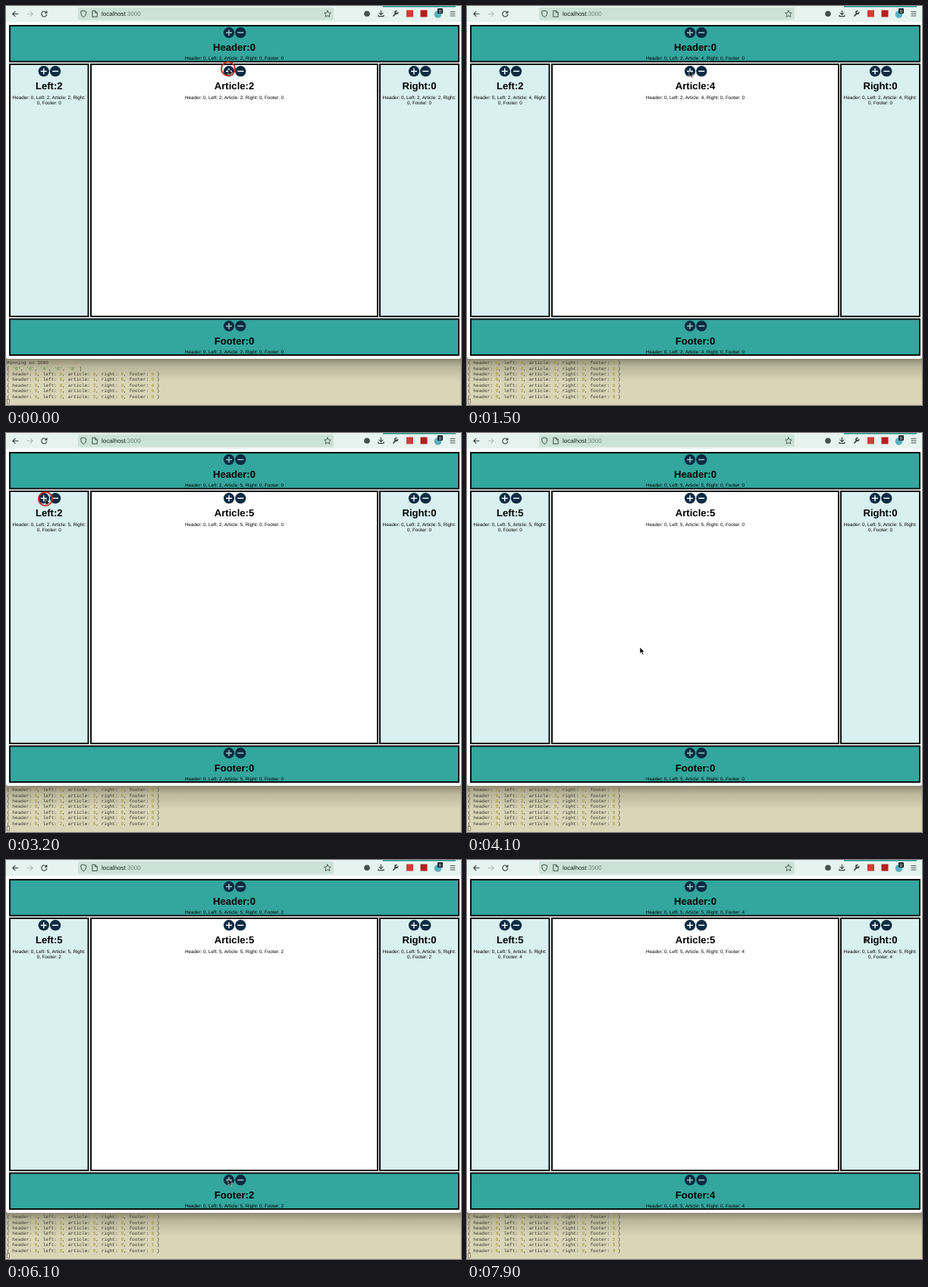
Write an HTML page that moves like this. It is 600x527 px and loops after 8000 ms.

```html
<!DOCTYPE html>
<html lang="en">
<head>
<meta charset="utf-8">
<title>Layout counters</title>
<style>
html, body { margin: 0; height: 100%; overflow: hidden; background: #dbd5b8; }
svg { display: block; width: 600px; height: 527px; text-rendering: geometricPrecision; }
text { font: 6.3px "Liberation Sans", Arial, sans-serif; }
.mid { text-anchor: middle; }
.title { font-size: 13.1px; font-weight: bold; }
.url { font-size: 8px; }
#log text { font: 6.12px "Liberation Mono", Courier, monospace; fill: #3a382e; }
#log .num { fill: #a0941c; }
#log .str { fill: #4b8a2c; }
.icon { fill: none; stroke: #34423d; stroke-width: 1.1; stroke-linecap: round; stroke-linejoin: round; }
</style>
</head>
<body>
<svg viewBox="0 0 600 527">
  <defs>
    <linearGradient id="shade" x2="0" y2="1">
      <stop stop-color="#55523f" stop-opacity=".6"/>
      <stop offset=".35" stop-color="#55523f" stop-opacity=".24"/>
      <stop offset="1" stop-color="#55523f" stop-opacity="0"/>
    </linearGradient>
  </defs>
  <rect width="600" height="527" fill="#dbd5b8"/>
  <rect y="465" width="600" height="32" fill="url(#shade)"/>
  <g id="log"></g>
  <rect x="1.5" y="519.5" width="3" height="6" fill="none" stroke="#77735f" stroke-width=".7"/>

  <path d="M0 0H600V463a3 3 0 0 1-3 3H3a3 3 0 0 1-3-3z" fill="#fff"/>
  <rect width="600" height="21" fill="#e7f3ee"/>
  <rect x="497" width="96" height="1.5" fill="#269187"/>
  <rect x="95" y="2" width="337" height="16.5" rx="2" fill="#cbe2d8"/>
  <g class="icon">
    <path d="M16 10.5H9M12 7.3 8.8 10.5 12 13.7"/>
    <path d="M28 10.5h7M32 7.3l3.2 3.2-3.2 3.2" stroke="#b3c1bb"/>
    <path d="M53.2 8.6a3.5 3.5 0 1 0 .5 2.8M53.9 6.7v2.4h-2.4"/>
    <path d="M102.2 6.2l3.5 1.2c0 4-.9 5.8-3.5 7.3-2.6-1.5-3.5-3.3-3.5-7.3z" stroke-width=".9"/>
    <path d="M114.2 6.3h3.6l2.4 2.4v5.6h-6zM117.6 6.5v2.4h2.4" stroke-width=".9"/>
    <path d="M424 6l1.3 2.8 3 .4-2.2 2.1.6 3-2.7-1.5-2.7 1.5.6-3-2.2-2.1 3-.4z" stroke-width=".8"/>
    <path d="M494.5 6v5.4M492 9.2l2.5 2.4L497 9.2M491 12v1.6h7V12"/>
    <path d="M511 13l3.6-3.8" stroke-width="1.8"/>
    <path d="M516.8 8.5a2 2 0 1 1-1.6-1.9" stroke-width="1.4"/>
    <path d="M586 7.6h6M586 10.3h6M586 13h6" stroke-width=".9"/>
  </g>
  <circle cx="476" cy="10.3" r="3.8" fill="#46514d"/>
  <rect x="528" y="5.5" width="9" height="9" fill="#cf3c37"/>
  <rect x="546.5" y="5.5" width="9" height="9" fill="#b51d1d"/>
  <circle cx="569.5" cy="11" r="4.8" fill="#58aebd"/>
  <rect x="569" y="3" width="7" height="7" rx="1" fill="#16262b"/>
  <text class="mid" x="572.5" y="8.7" fill="#fff" style="font-size:6px">0</text>
  <text class="url" x="126" y="13.2" fill="#1c2723">localhost<tspan fill="#6f827a">:3000</tspan></text>

  <g id="panels"></g>
  <circle id="ring" r="9" fill="none" stroke="#c52a20" stroke-width="2"/>
  <path id="arrow" d="M0 0v8.4l2-1.8 1.4 3.2 1.4-.6-1.4-3.1h2.7z" fill="#000" stroke="#fff" stroke-width=".6"/>
  <path id="beam" d="M-1.8-3.6Q0-3.6 0-2.4V2.4Q0 3.6-1.8 3.6M1.8-3.6Q0-3.6 0-2.4V2.4Q0 3.6 1.8 3.6" fill="none" stroke="#333" stroke-width=".9"/>
</svg>
<script>
const LOOP = 8000, STEP = 100;
const TEAL = '#33a69e', PALE = '#d8f0ef', NAVY = '#0b2b42';
const $ = id => document.getElementById(id);

// name, left, top, right, bottom, fill, icon sign colour
const panels = [
  ['Header', 4, 25, 598, 74.5, TEAL, '#8fc9c8'],
  ['Left', 4, 76, 109.5, 411, PALE, '#eefafa'],
  ['Article', 111, 76, 491, 411, '#fff', '#fff'],
  ['Right', 492, 76, 598, 411, PALE, '#eefafa'],
  ['Footer', 4, 412.5, 598, 462, TEAL, '#8fc9c8']
];
const names = panels.map(p => p[0]);

const clicks = [
  [-4, 'Article'], [-3, 'Article'], [-2, 'Left'], [-1, 'Left'],
  [200, 'Article'], [900, 'Article'], [1800, 'Article'],
  [3300, 'Left'], [3550, 'Left'], [3800, 'Left'],
  [5500, 'Footer'], [5950, 'Footer'], [6400, 'Footer'], [6900, 'Footer']
];

// time, x, y of the pointer
const route = [
  [0, 293, 83], [1000, 293, 85], [2100, 293, 85], [2900, 52, 87], [3800, 52, 87],
  [4100, 228, 283], [4500, 228, 283], [5200, 291, 418], [5500, 291, 418],
  [5900, 293, 421], [7200, 293, 421], [7800, 526, 105.5], [8000, 526, 105.5]
];

function button(x, y, sign, plus) {
  return `<circle cx="${x}" cy="${y}" r="7.1" fill="${NAVY}"/>
    <path d="M${x - 4} ${y}h8${plus ? `M${x} ${y - 4}v8` : ''}" stroke="${sign}" stroke-width="1.5"/>`;
}

$('panels').innerHTML = panels.map(([name, l, t, r, b, fill, sign]) => {
  const mid = (l + r) / 2, y = t + 10.2, first = mid - 7;
  const narrow = r - l < 200;
  const note = t === 76 ? 122.6 : t + 46;
  return `<rect x="${l + 1}" y="${t + 1}" width="${r - l - 2}" height="${b - t - 2}" fill="${fill}" stroke="#0a0f10" stroke-width="2"/>
    ${button(first, y, sign, true)}${button(first + 15.3, y, sign, false)}
    <text class="mid title" id="${name}" x="${mid}" y="${t + 34.3}"></text>
    <text class="mid" id="${name}Note" x="${mid}" y="${note}"></text>
    ${narrow ? `<text class="mid" id="${name}Rest" x="${mid}" y="${note + 7.1}"></text>` : ''}`;
}).join('');

$('log').innerHTML = Array.from({ length: 7 }, (_, i) =>
  `<text x="1" y="${473.2 + i * 7.4}"></text>`).join('');

const list = counts => names.map(n => `${n}: ${counts[n]}`).join(', ');

function showCounts(t) {
  const counts = Object.fromEntries(names.map(n => [n, 0]));
  const entry = () => `{ ${list(counts).toLowerCase()} }`.replace(/\d+/g, '<tspan class="num">$&</tspan>');
  const lines = ['Running on 3000',
    `[ ${Array(5).fill('<tspan class="str">\'0\'</tspan>').join(', ')} ]`, entry()];
  for (const [time, name] of clicks) {
    if (time > t) break;
    counts[name]++;
    lines.push(entry());
  }
  lines.slice(-7).forEach((line, i) => $('log').children[i].innerHTML = line);

  const note = list(counts), cut = note.indexOf('Right:') + 6;
  for (const name of names) {
    const rest = $(name + 'Rest');
    $(name).textContent = `${name}:${counts[name]}`;
    $(name + 'Note').textContent = rest ? note.slice(0, cut) : note;
    if (rest) rest.textContent = note.slice(cut + 1);
  }
}

function showPointer(t) {
  const i = route.findIndex(p => p[0] > t);
  const [t0, x0, y0] = route[i - 1], [t1, x1, y1] = route[i];
  const u = (t - t0) / (t1 - t0), k = u * u * (3 - 2 * u);
  const at = `translate(${x0 + (x1 - x0) * k} ${y0 + (y1 - y0) * k})`;
  const overText = t >= 7800;
  const pressed = clicks.some(([time]) => time > 0 && t >= time - 200 && t < time + 100);
  for (const [id, on] of [['ring', pressed], ['arrow', !overText], ['beam', overText]]) {
    $(id).setAttribute('transform', at);
    $(id).setAttribute('visibility', on ? 'visible' : 'hidden');
  }
}

const start = performance.now();
let shown = -1;
function tick() {
  const t = Math.floor((performance.now() - start) % LOOP / STEP) * STEP;
  if (t !== shown) {
    shown = t;
    showCounts(t);
    showPointer(t);
  }
  requestAnimationFrame(tick);
}
tick();
</script>
</body>
</html>
```
